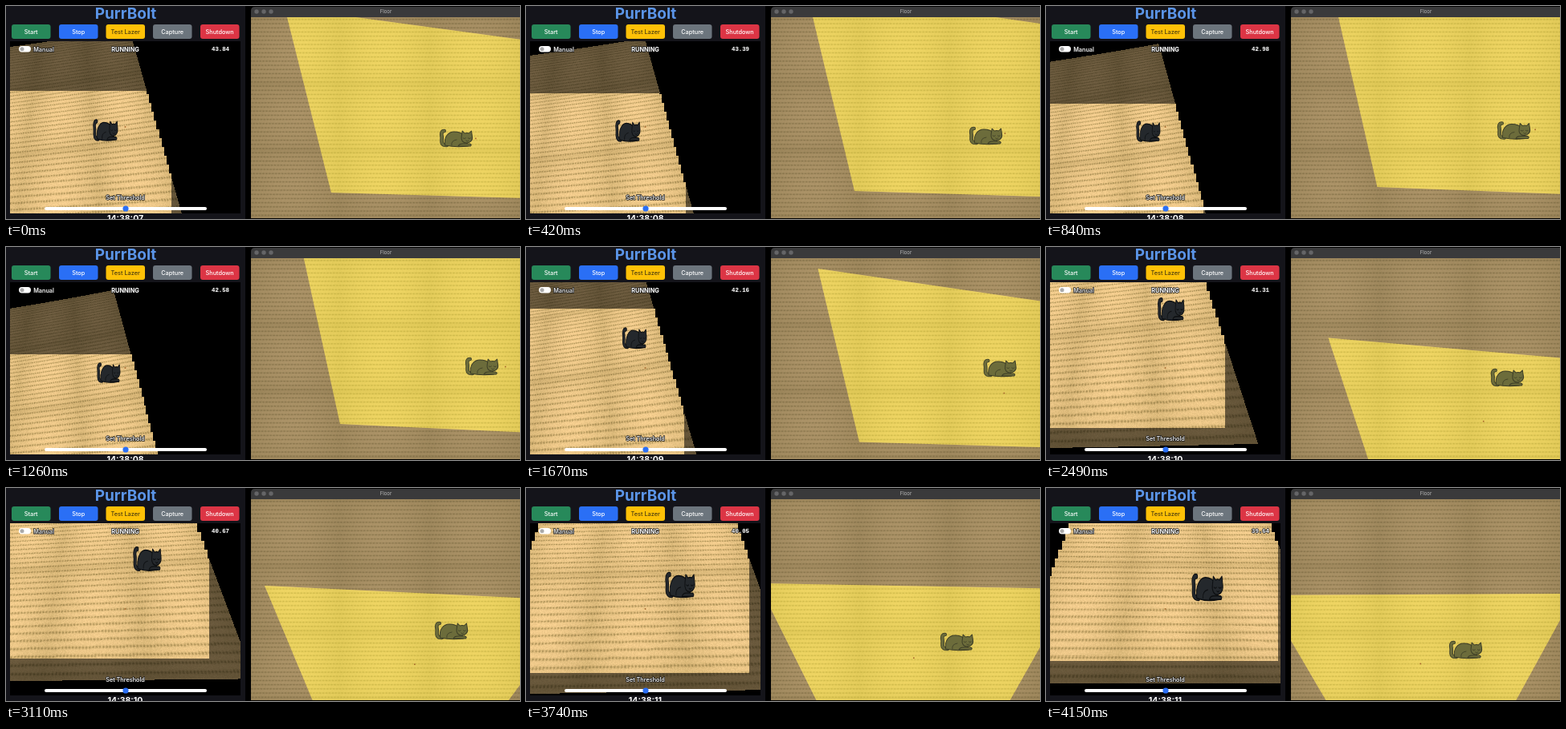
Write an HTML page with a canvas that moves like this. It is 640x266 px and loops after 4.17 s.

```html
<!DOCTYPE html>
<html lang="en">
<head>
<meta charset="utf-8">
<title>PurrBolt</title>
<style>
html, body { margin: 0; width: 100%; height: 100%; overflow: hidden; background: #14141a; }
canvas, svg { position: absolute; left: 0; top: 0; width: 640px; height: 266px; }
text { font: 500 7.3px Inter, sans-serif; fill: #fff; text-anchor: middle; }
.glow text { paint-order: stroke; stroke: #181818; stroke-width: 1.4px; stroke-linejoin: round; }
#left { font: 700 7.3px "Liberation Mono", monospace; }
</style>
</head>
<body>
<canvas id="view" width="640" height="266"></canvas>
<svg viewBox="0 0 640 266">
  <text x="149" y="16" style="font-size:19px;font-weight:700;fill:#5b95e8">PurrBolt</text>
  <g id="buttons"></g>
  <g class="glow">
    <rect x="16" y="50" width="15" height="7.4" rx="3.7" fill="#fff"/>
    <circle cx="20" cy="53.7" r="2.5" fill="#aaa"/>
    <text x="47" y="56.5">Manual</text>
    <text x="148.500" y="56.500" style="font-weight:700">RUNNING</text>
    <text id="left" x="267" y="56"></text>
    <text x="148.500" y="241.500">Set Threshold</text>
  </g>
  <rect x="48" y="251" width="202" height="4" rx="2" fill="#fff"/>
  <circle cx="149" cy="253" r="3.600" fill="#2a6ff5"/>
  <text id="clock" x="148.500" y="269" style="font-size:10.5px;font-weight:700"></text>
  <path d="M305 14V6q0-5 5-5H640V14z" fill="#3a3a3b"/>
  <g fill="#656567"><circle cx="312" cy="7" r="2.700"/><circle cx="321" cy="7" r="2.700"/><circle cx="330" cy="7" r="2.700"/></g>
  <text x="473" y="9" style="font-size:6px;fill:#aaa">Floor</text>
</svg>
<script>
const $ = id => document.getElementById(id);
const ctx = $('view').getContext('2d');
const LOOP = 4170;
const STEPS = [0, 210, 420, 630, 840, 1050, 1260, 1460, 1670, 1880, 2080,
  2290, 2490, 2700, 2910, 3110, 3320, 3530, 3740, 3950, 4150];
const TICKS = [420, 1460, 2490, 3320];

// time | camera footprint on the floor: TL, TR, BR, BL | lit area offset |
// cat on the floor | cat in camera: x, y, width | countdown
const KEYS = [
  [0, 347, 2, 899, 77, 721, 242, 405, 233, -86, 62, 560, 165, 123.5, 155, 31, 43.84],
  [420, 349, -20, 931, 64, 735, 241, 409, 231, -93, 65, 572, 162, 126.5, 156, 31, 43.39],
  [1260, 356, -54, 1004, 58, 765, 237, 416, 221, -100, 90, 592, 149, 127.5, 157, 29, 42.58],
  [2080, 371, 108, 822, 157, 689, 268, 414, 266, -90, -25, 587, 153, 142, 70.5, 32, 41.74],
  [3110, 322, 122, 717, 141, 620, 273, 385, 273, -39, -46, 554, 178, 175.5, 88.5, 35, 40.67],
  [3740, 289, 119, 681, 126, 601, 268, 362, 266, -14, -28, 536, 192, 191.5, 121, 37, 40.05],
  [4150, 272, 134, 658, 132, 582, 271, 352, 271, -3, -43, 522, 202, 200.5, 124, 39, 39.64]
];
const CAM = { x: 5, y: 44, w: 287, h: 215 };
const WIN = { x: 305, y: 14, w: 335, h: 251 };

const BUTTONS = [['Start', 7, '#27895a'], ['Stop', 66, '#2a6ff5'], ['Test Lazer', 124.5, '#ffc107'],
  ['Capture', 183, '#6c757d'], ['Shutdown', 242, '#dc3545']];
$('buttons').innerHTML = BUTTONS.map(([label, x, color]) =>
  `<rect x="${x}" y="23" width="48.500" height="18" rx="3" fill="${color}"/>
   <text x="${x + 24.2}" y="34.700" ${label == 'Test Lazer' ? 'style="fill:#4a3c10"' : ''}>${label}</text>`).join('');

// Woven mat, two texels per pixel
const TW = WIN.w * 2, TH = WIN.h * 2;
const mat = new ImageData(TW, TH);
let seed = 7;
const rnd = () => (seed = seed * 16807 % 2147483647) / 2147483647;
for (let j = 0, k = 0; j < TH; j++) for (let i = 0; i < TW; i++, k += 4) {
  const u = i / 2, v = j / 2, row = v / 5.2;
  const line = Math.exp(-(((row % 1 - .5) / .17) ** 2));
  const thread = .65 + .35 * Math.sin(u * 1.6 + Math.floor(row) * 2.1);
  const a = (u + 2) / 112 % 1, b = v / 83 % 1;
  const shade = .95 + .1 * Math.sin(Math.PI * a) * (.5 + .5 * Math.sin(Math.PI * b))
    - .05 * Math.exp(-Math.min(b, 1 - b) * 30);
  const l = shade * (1 - .27 * line * thread) + (rnd() - .5) * .07;
  mat.data.set([228 * l, 192 * l, 130 * l ** 1.4, 255], k);
}
const matCanvas = document.createElement('canvas');
matCanvas.width = TW;
matCanvas.height = TH;
matCanvas.getContext('2d').putImageData(mat, 0, 0);

function pose(t) {
  let i = 0;
  while (i < KEYS.length - 2 && t >= KEYS[i + 1][0]) i++;
  const a = KEYS[i], b = KEYS[i + 1], f = (t - a[0]) / (b[0] - a[0]);
  return a.map((v, n) => v + (b[n] - v) * f);
}

// Floor positions of both ends of a camera row, 0 = top, 1 = bottom
function cameraRow(q, t) {
  const w = t * (q[2] - q[0]) / (q[4] - q[6]), f = w / (1 - t + w);
  const mix = (a, b) => a + (b - a) * f;
  return [mix(q[0], q[6]), mix(q[1], q[7]), mix(q[2], q[4]), mix(q[3], q[5])];
}

const image = ctx.createImageData(CAM.w, CAM.h);
function drawCamera(q, dx, dy) {
  const { w, h } = CAM, out = image.data;
  for (let y = 0, k = 0; y < h; y++) {
    const [x0, y0, x1, y1] = cameraRow(q, y / h);
    const coarse = cameraRow(q, (Math.floor(y / 11) * 11 + 5) / h);
    for (let x = 0; x < w; x++, k += 4) {
      const s = x / w;
      const u = x0 + (x1 - x0) * s - WIN.x, v = y0 + (y1 - y0) * s - WIN.y;
      const lit = x < w + dx && y >= dy && y < h + dy;
      // the lit area has a stepped outline
      const edge = lit ? coarse[0] + (coarse[2] - coarse[0]) * s - WIN.x : u;
      const inside = edge >= 0 && edge < WIN.w && v >= 0 && v < WIN.h;
      const tx = Math.max(0, Math.min(TW - 1, Math.floor(u * 2)));
      const p = (Math.floor(v * 2) * TW + tx) * 4;
      const gain = inside ? (lit ? 1.02 : .46) : 0;
      for (let c = 0; c < 3; c++) out[k + c] = gain && mat.data[p + c] * gain;
      out[k + 3] = 255;
    }
  }
  ctx.putImageData(image, CAM.x, CAM.y);
}

const TAIL = new Path2D('M-11 9C-20 9-16 2-17-2C-18-6-17-9-14-9');
const BODY = new Path2D('M-13 9C-15-1-9-8-2-8C4-8 8-6 11-3L15 10Q0 12-13 9Z');
const HEAD = new Path2D('M7-2L8-9L11-6Q14-7 16-6L19-9L20-2C21 3 17 6 13 6C9 6 6 3 7-2Z');
const PAWS = new Path2D('M3 10Q4 7 9 7L17 7Q20 8 18 10Z');
const FACE = new Path2D('M9 0Q10.500 1.500 12 0M15 0Q16.500 1.500 18 0M12.500 3L14 4L15.500 3M-5 9Q-6 3 1 2');
function cat(x, y, w, h, fill, line) {
  ctx.save();
  ctx.translate(x, y);
  ctx.scale(w / 40, h / 22);
  ctx.lineCap = ctx.lineJoin = 'round';
  const stroke = (path, color, width) => {
    ctx.strokeStyle = color;
    ctx.lineWidth = width;
    ctx.stroke(path);
  };
  stroke(TAIL, line, 4.6);
  stroke(TAIL, fill, 3);
  ctx.fillStyle = fill;
  for (const part of [BODY, PAWS, HEAD]) {
    ctx.fill(part);
    stroke(part, line, 1);
  }
  stroke(FACE, line, .8);
  ctx.restore();
}

function dot(x, y) {
  ctx.fillStyle = '#a5642a';
  ctx.fillRect(x - .8, y - .8, 1.6, 1.6);
}

function clipTo({ x, y, w, h }) {
  ctx.save();
  ctx.beginPath();
  ctx.rect(x, y, w, h);
  ctx.clip();
}

function draw(t) {
  const p = pose(t), q = p.slice(1, 9);
  const [dx, dy, cx, cy, lx, ly, lw, rest] = p.slice(9);
  ctx.fillStyle = '#14141a';
  ctx.fillRect(0, 0, 640, 266);
  ctx.fillStyle = '#000';
  ctx.fillRect(298, 0, 342, 266);

  drawCamera(q, dx, dy);
  clipTo(CAM);
  dot(148.5, 151);
  cat(lx, ly, lw, lw * .86, '#24282c', '#0d0f11');
  ctx.restore();

  clipTo(WIN);
  ctx.drawImage(matCanvas, WIN.x, WIN.y, WIN.w, WIN.h);
  const area = new Path2D();
  for (let i = 0; i < 8; i += 2) area.lineTo(q[i], q[i + 1]);
  area.closePath();
  const rim = new Path2D(area);
  rim.rect(WIN.x, WIN.y, WIN.w, WIN.h);
  ctx.fillStyle = 'rgba(90,80,60,.45)';
  ctx.fill(rim, 'evenodd');
  ctx.fillStyle = 'rgba(240,225,60,.5)';
  ctx.fill(area);
  const [x0, y0, x1, y1] = cameraRow(q, .5);
  dot((x0 + x1) / 2, (y0 + y1) / 2);
  cat(cx, cy, 41, 22, '#6c6c3b', '#3c3d26');
  ctx.restore();

  $('left').textContent = rest.toFixed(2);
  $('clock').textContent = '14:38:' + String(7 + TICKS.filter(k => k <= t).length).padStart(2, '0');
}

let shown = -1;
const start = performance.now();
function frame() {
  const now = (performance.now() - start) % LOOP;
  const step = STEPS.filter(s => s <= now).pop();
  if (step !== shown) draw(shown = step);
  requestAnimationFrame(frame);
}
frame();
</script>
</body>
</html>
```
